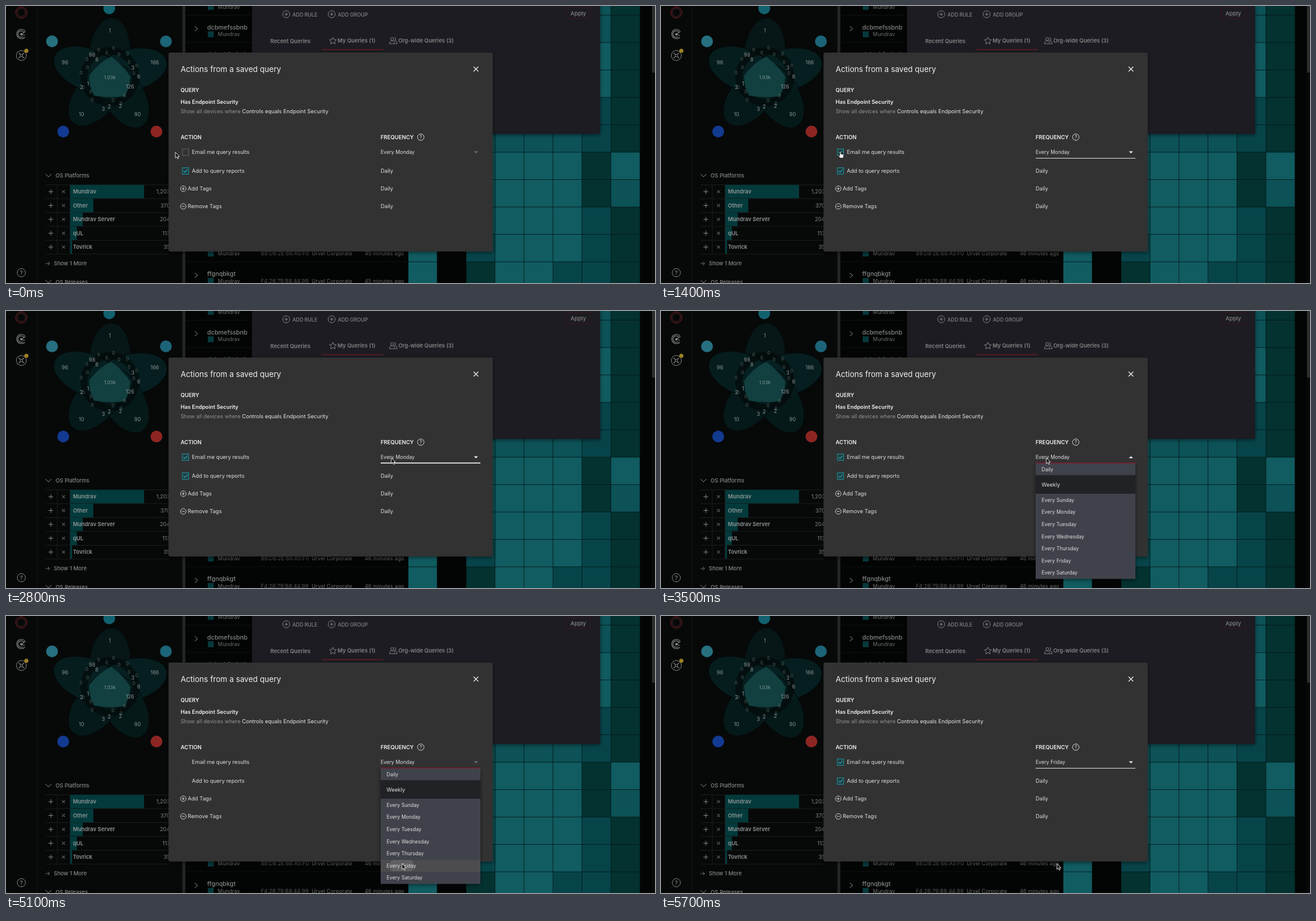
Animation of 1100 by 470 pixels, one loop 7700 ms. Source, as an HTML page:

```html
<!DOCTYPE html>
<html lang="en">
<head>
<meta charset="utf-8">
<title>Saved query actions</title>
<style>
html, body { margin: 0; width: 100%; height: 100%; overflow: hidden; background: #030505; }
svg { display: block; width: 1100px; height: 470px; }
text { font-family: Inter, Roboto, sans-serif; white-space: pre; }
</style>
</head>
<body>
<svg id="stage" viewBox="0 0 1100 470">
  <defs>
    <filter id="shadow" x="-10%" y="-15%" width="120%" height="130%">
      <feDropShadow dx="0" dy="2" stdDeviation="3" flood-color="#000" flood-opacity=".5"/>
    </filter>
  </defs>
  <g id="page"></g>
  <g id="dialog"></g>
  <g id="menu"></g>
  <g id="cursor"></g>
</svg>
<script>
const $ = id => document.getElementById(id);

// Markup helpers; text is placed by its vertical middle.
const text = (x, y, s, size = 9.1, fill = '#dedede', weight = 400, anchor = 'start') =>
  `<text x="${x}" y="${y + size * .36}" font-size="${size}" fill="${fill}" font-weight="${weight}" text-anchor="${anchor}">${s}</text>`;
const rect = (x, y, w, h, fill, extra = '') =>
  `<rect x="${x}" y="${y}" width="${w}" height="${h}" fill="${fill}" ${extra}/>`;
const circle = (x, y, r, fill, extra = '') =>
  `<circle cx="${x}" cy="${y}" r="${r}" fill="${fill}" ${extra}/>`;
const line = (d, stroke, width = 1, extra = '') =>
  `<path d="${d}" fill="none" stroke="${stroke}" stroke-width="${width}" ${extra}/>`;
const ring = (x, y, r, stroke, width = 1) => line(`M${x - r} ${y}a${r} ${r} 0 1 0 ${2 * r} 0a${r} ${r} 0 1 0 ${-2 * r} 0`, stroke, width);
const plus = (x, y, r, stroke) => line(`M${x - r} ${y}h${2 * r}M${x} ${y - r}v${2 * r}`, stroke);
const cross = (x, y, r, stroke, width = 1) =>
  line(`M${x - r} ${y - r}l${2 * r} ${2 * r}M${x + r} ${y - r}l${-2 * r} ${2 * r}`, stroke, width);
const helpIcon = (x, y, r, color, size) => ring(x, y, r, color) + text(x, y, '?', size, color, 500, 'middle');

const GRAY = '#858585', DIM = '#6d6d6d', FAINT = '#1b1d1d';

function heatmap() {
  const shades = ['#030505', '#033230', '#07444a', '#0c5257', '#105c61'];
  const rows = ['33333331', '33333331', '33333341', '33333341', '33333321', '30333321',
                '30344414', '30344413', '30344421', '40244421', '40144221'];
  return rect(682, 0, 393, 470, '#03191a') + rect(731, 0, 49, 470, shades[0]) +
    rows.map((row, r) => [...row].map((s, c) =>
      rect(682 + c * 49.1, -30.5 + r * 46.5, 48.2, 45.6, shades[s])).join('')).join('');
}

function sidebar() {
  const x = 26;
  return line('M52.5 0V470', '#121515') +
    ring(x, 11, 9.5, '#842026') + ring(x, 11, 7, '#4e2a2c') +
    // radar
    line('M32 42a8 8 0 1 0 0 11M30 44a5.5 5.5 0 1 0 -1 8M26 48l7 -5M26 48l6 2', GRAY, 1.2) + circle(x, 48, 2, GRAY) +
    // inward arrows
    ring(x, 84, 8.5, GRAY) + cross(x, 84, 4.5, GRAY, 1.2) + circle(x, 84, 2, '#050707', `stroke="${GRAY}"`) +
    circle(34.5, 76, 3.5, '#9c8124') + helpIcon(x, 452.5, 7, GRAY, 9.5);
}

function flower() {
  const cx = 176, cy = 120;
  const fills = ['#08191a', '#072324', '#071d1d', '#071d1e', '#072223'];
  const petals = fills.map((fill, i) =>
    `<ellipse cx="${cx}" cy="${cy - 38}" rx="35" ry="62" fill="${fill}" fill-opacity=".85" stroke="#040808" transform="rotate(${i * 72} ${cx} ${cy}) rotate(4 ${cx} ${cy - 38})"/>`).join('');
  const core = `<path d="M178 86Q197 99 211 120Q209 137 202 153Q177 157 149 152Q141 137 141 118Q157 96 178 86Z" fill="#123f3f"/>`;
  const band = circle(cx, cy, 44, 'none', 'stroke="#040909" stroke-width="12" stroke-opacity=".65"');
  let zeros = '';
  for (let i = 0; i < 24; i++) {
    const a = i * Math.PI / 12 + .13, r = i % 2 ? 41 : 49;
    if (![0, 1, 2, 6, 7, 11, 15].includes(i))
      zeros += text(cx + r * Math.cos(a), cy + r * Math.sin(a), '0', 7.5, '#596565', 400, 'middle');
  }
  const counts = [[1, 176, 42], [96, 100, 96], [166, 252, 96], [10, 128, 184], [90, 223, 184], [98, 146, 83], [8, 154, 91],
    [3, 215, 105], [6, 225, 120], [126, 210, 137], [1, 139, 132], [2, 128, 138], [3, 165, 175], [2, 175, 171], [2, 194, 170]];
  const labels = counts.map(([n, x, y]) => text(x, y, n, 8.7, '#8a9292', 400, 'middle')).join('');
  const badges = [[175, 4, '#12616f'], [78, 60, '#267080'], [271, 60, '#1c6478'], [97, 213, '#123a91'], [255, 213, '#8d2623']]
    .map(([x, y, fill]) => circle(x, y, 10, fill)).join('');
  return petals + band + core + zeros + labels + text(cx, 121, '1.03k', 8, '#7f9999', 400, 'middle') + badges;
}

function platforms() {
  const items = [['Mundrav', '1,203', 125], ['Other', '370', 39], ['Mundrav Server', '204', 21], ['qUL', '113', 11], ['Tovrick', '35', 3]];
  let out = line('M67 285l5 5l5 -5M67 465l5 5l5 -5', GRAY) + text(84, 287.5, 'OS Platforms', 9.2, GRAY, 500) +
    text(84, 468.5, 'OS Releases', 9.2, GRAY, 500) + line('M67 303.5H276', FAINT);
  items.forEach(([name, count, width], i) => {
    const y = 315 + i * 23.5;
    out += rect(109, y - 11.5, width, 23, '#033a3b') + line(`M67 ${y + 12}H276M87 ${y - 11}v23M108.5 ${y - 11}v23`, FAINT) +
      plus(76, y, 4, GRAY) + cross(97.5, y, 2.5, GRAY) +
      text(113.5, y, name, 9.2, '#8f9696', 600) + text(278, y, count, 9.1, GRAY, 400, 'end');
  });
  return out + line('M67 437h7m-3 -3l3 3l-3 3', DIM) + text(81, 437, 'Show 1 More', 9.2, GRAY, 500);
}

function devices() {
  const rows = [[-10.5, ''], [36, 'dcbmefssbnb'], [82.5, 'dcbmkfsqbnb'], [408, ''], [454.5, 'ffgnqbkgt']];
  let out = rows.map(([y, name]) =>
    line(`M320 ${y - 1.5}l5 4l-5 4`, GRAY) + text(341, y, name, 10.4, GRAY, 500) +
    rect(342, y + 7, 10, 10, '#07393c') + text(359, y + 12, 'Mundrav', 9, DIM) +
    line(`M305 ${y + 26}H680`, '#0e1111')).join('');
  [[420, '88:D8:2E:66:A5:F0'], [466.5, 'F4:26:79:B8:44:99']].forEach(([y, mac]) => {
    out += text(432, y, mac, 9.1, '#565656') + text(518, y, 'Urvel Corporate', 9.1, '#656565') +
      `<g class="age">${text(608, y, '45 minutes ago', 9.1, '#656565')}</g>`;
  });
  return out;
}

function queryPanel() {
  const star = 'M554 53l1.8 3.8l4.2 .5l-3.1 2.9l.8 4.1l-3.7 -2l-3.7 2l.8 -4.1l-3.1 -2.9l4.2 -.5z';
  const people = 'M650 64q0 -5 4.5 -5t4.5 5zM660 64h3q0 -5 -4 -5M652 56a2.4 2.4 0 1 0 5 0a2.4 2.4 0 1 0 -5 0M658 53.5a2.4 2.4 0 0 1 0 5';
  return rect(417, -10, 590, 227, '#1b1b20', 'filter="url(#shadow)"') +
    [[475, 'ADD RULE'], [552, 'ADD GROUP']].map(([x, s]) =>
      ring(x, 14, 6, GRAY) + plus(x, 14, 3, GRAY) + text(x + 10.5, 14.5, s, 8.5, GRAY, 500)).join('') +
    rect(949.5, 2.5, 41, 19, 'none', 'stroke="#44171b" stroke-dasharray="3 1"') + text(970, 12.5, 'Apply', 9.5, GRAY, 500, 'middle') +
    text(448, 59.5, 'Recent Queries', 9.2, GRAY, 600) +
    line(star, GRAY) + text(562, 58.5, 'My Queries (1)', 9.2, GRAY, 600) +
    line(people, GRAY) + text(665, 58.5, 'Org-wide Queries (3)', 9.2, GRAY, 600) +
    line('M535 74H639', '#8a1b22', 1.2);
}

function buildPage() {
  return heatmap() + rect(0, 0, 299, 470, '#070909') + sidebar() + flower() + platforms() + rect(299, 0, 5, 470, '#242626') +
    devices() + queryPanel() + rect(1094, 0, 6, 470, '#080a0a') + rect(1095, 0, 5, 113, '#2b2d2d');
}

function checkbox(y, mode) {
  if (mode === 'faded') return rect(299, y - 5.5, 10.5, 11, 'none', 'stroke="#363640"');
  const on = mode === 'on';
  return rect(299, y - 5.5, 10.5, 11, on ? '#263b3e' : 'none', `stroke="${on ? '#1598a3' : '#606060'}"`) +
    (on ? line(`M301.3 ${y}l2.2 2.3l4 -4.6`, '#25aab4', 1.2) : '');
}

function dialogMarkup(s) {
  const open = s.menu > 0, active = s.email === 'on', W = '#f0f0f0';
  const thick = s.thick || open;
  const underline = open ? '#8c1c2c' : active ? '#e6e6e6' : 'none';
  const arrow = open && active ? 'M793 249.8h7l-3.5 -3.6z' : 'M793 246.4h7l-3.5 3.6z';
  const row = (y, s, sign) => ring(300.5, y, 4.7, '#d0d0d0') +
    line(`M298 ${y}h5` + (sign === '+' ? `M300.5 ${y - 2.5}v5` : ''), '#d0d0d0') + text(308, y, s);
  return rect(275.5, 79, 549.5, 337.5, '#333', 'rx="3" filter="url(#shadow)"') +
    text(296, 107.5, 'Actions from a saved query', 13.1, W) + cross(796.5, 107, 4, W, 1.2) +
    line('M296 127.5H804M296 197.5H804M296 263.5H804M296 295.5H804M296 325.5H804', '#31303a') +
    text(296, 142.5, 'QUERY', 9.1, W, 600) + text(296, 163, 'Has Endpoint Security', 9.15, W, 600) +
    text(296, 178.5, 'Show all devices where <tspan fill="#e8e8e8">Controls equals Endpoint Security</tspan>', 9.15, '#939393') +
    text(296, 222.5, 'ACTION', 9.1, W, 600) + text(635, 222.5, 'FREQUENCY', 9.1, W, 600) + helpIcon(703, 222.5, 5.5, '#d8d8d8', 8) +
    checkbox(248, s.email) + text(315, 248, 'Email me query results') +
    checkbox(280, s.email === 'faded' ? 'faded' : 'on') + text(315, 280, 'Add to query reports') +
    row(310, 'Add Tags', '+') + row(340, 'Remove Tags', '-') +
    text(635, 247.5, s.value, 8.5) + `<path d="${arrow}" fill="${active ? '#eee' : '#707070'}"/>` +
    line(`M635 ${thick ? 257.8 : 258.3}H804`, underline, thick ? 1.7 : 1) +
    [280, 310, 340].map(y => text(635, y, 'Daily')).join('');
}

const days = ['Sunday', 'Monday', 'Tuesday', 'Wednesday', 'Thursday', 'Friday', 'Saturday'];
function menuMarkup(s) {
  if (!s.menu) return '';
  let out = rect(635, 258.5, 169, 196, '#3f424b', 'filter="url(#shadow)"') + rect(635, 278.5, 169, 31.5, '#212226');
  if (s.hover !== null) out += rect(635, 310.3 + s.hover * 20.65, 169, 20.6, '#4c4c4f');
  if (s.ripple) out += rect(671 - s.ripple, 414, 2 * s.ripple, 19, '#606062', 'rx="6"');
  return out + text(645, 268.5, 'Daily', 8.5) + text(645, 294.5, 'Weekly', 9.1) +
    days.map((day, i) => text(645, 320.7 + i * 20.6, 'Every ' + day, 8.5)).join('');
}

const arrowCursor = '<path d="M0 0V10L2.3 7.9L4 11.3L5.6 10.5L4 7.3H7Z" fill="#151515" stroke="#eee" stroke-width=".9"/>';
const handCursor = '<path d="M-1 0q1 -1 2 0v4l3.5 .8q1.4 .3 1.2 1.7l-.6 4.5h-5.6l-3 -4.2q.6 -1 2.5 .3z" fill="#fff" stroke="#111" stroke-width=".8"/>';

// Each step holds until the next one; unnamed properties carry over.
const start = { x: 287, y: 248, hand: false, email: 'off', value: 'Every Monday', thick: false, menu: 0, hover: null, ripple: 0, age: 45 };
const steps = [
  [0, {}],
  [500, { x: 297, y: 248 }],
  [1000, { x: 304, y: 247, hand: true }],
  [1200, { email: 'on', age: 46 }],
  [2400, { x: 400, y: 249, hand: false }],
  [2600, { x: 580, y: 250 }],
  [2800, { x: 653, y: 249, thick: true }],
  [3300, { menu: .6 }],
  [3500, { menu: 1 }],
  [4000, { x: 666, y: 312, hover: 0 }],
  [4200, { x: 677, y: 373, hover: 2 }],
  [4400, { x: 674, y: 404, hover: 4 }],
  [4600, { x: 671, y: 420, hover: 5 }],
  [5100, { ripple: 20, email: 'faded' }],
  [5300, { ripple: 60 }],
  [5500, { ripple: 0, email: 'on', value: 'Every Friday', menu: .4 }],
  [5700, { menu: 0, thick: false }]
];

const origin = performance.now();
let shown = -1;
function draw() {
  const t = (performance.now() - origin) % 7700;
  const index = steps.findLastIndex(([time]) => time <= t);
  if (index !== shown) {
    shown = index;
    const s = Object.assign({}, start, ...steps.slice(0, index + 1).map(step => step[1]));
    $('dialog').innerHTML = dialogMarkup(s);
    $('menu').innerHTML = menuMarkup(s);
    $('menu').setAttribute('opacity', s.menu);
    $('cursor').innerHTML = s.hand ? handCursor : arrowCursor;
    $('cursor').setAttribute('transform', `translate(${s.x} ${s.y})`);
    document.querySelectorAll('.age text').forEach(el => el.textContent = s.age + ' minutes ago');
  }
  requestAnimationFrame(draw);
}

$('page').innerHTML = buildPage();
draw();
</script>
</body>
</html>
```
